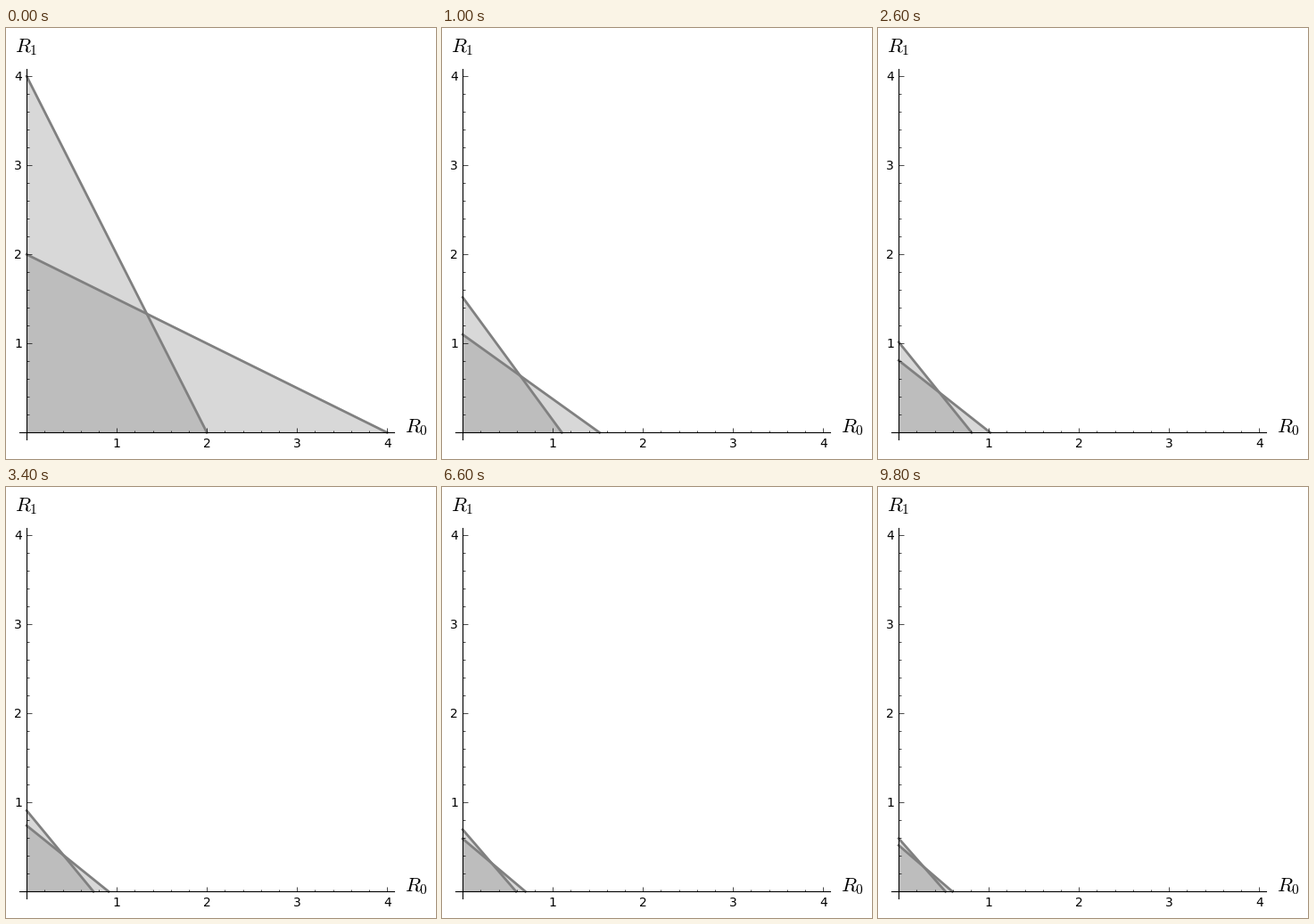
Recreate the animation shown at these times as a matplotlib script. Size 482 px wide and 484 px high, loop 10 s.

```python
import numpy as np
import matplotlib.pyplot as plt
from matplotlib.animation import FuncAnimation

W, H, DPI = 482, 484, 100
FRAMES, INTERVAL = 50, 200
X0, Y0 = 23.2, 454.3          # pixel position of the plot's zero point
UX, UY = 101.0, 100.0         # pixels per unit
MARGIN = 0.08                 # axes reach this far past 0 and 4
MAJOR, MINOR = 5.6, 2.8       # tick lengths

plt.rcParams["font.family"] = "DejaVu Sans"
plt.rcParams["mathtext.fontset"] = "cm"


def px(x):
    return X0 + UX * x


def py(y):
    return Y0 - UY * y


def uptake_path(count, rate=0.05, capacity=2.0, substeps=200):
    """Mean uptake of two consumers adapting to two logistic resources."""
    h, path = 0.375, []
    dt = 1 / substeps
    for _ in range(count):
        path.append(h)
        for _ in range(substeps):
            resource = 1 / (2 * h)
            h += dt * rate * (1 - resource / capacity) / h**2
    return path


uptake = uptake_path(FRAMES)

fig = plt.figure(figsize=(W / DPI, H / DPI), dpi=DPI, facecolor="white")
ax = fig.add_axes([0, 0, 1, 1])
ax.set_xlim(0, W)
ax.set_ylim(H, 0)
ax.axis("off")


def stroke(xs, ys, width, cap="butt"):
    ax.plot(xs, ys, color="black", lw=width, solid_capstyle=cap,
            snap=True, zorder=3)


def draw_axes():
    ends = np.array([-MARGIN, 4 + MARGIN])
    stroke(px(ends), [Y0, Y0], 0.8, "projecting")
    stroke([X0, X0], py(ends), 0.8, "projecting")
    for i in range(1, 21):
        v = i / 5
        size = MINOR if i % 5 else MAJOR
        stroke([px(v)] * 2, [Y0, Y0 - size], 0.5)
        stroke([X0, X0 + size], [py(v)] * 2, 0.5)
    for n in range(1, 5):
        ax.text(px(n), 471, str(n), size=10, ha="center", va="baseline")
        ax.text(18, py(n) + 4.7, str(n), size=10, ha="right", va="baseline")
    ax.text(447, 454, "$R_0$", size=16, ha="left", va="baseline")
    ax.text(22.5, 27, "$R_1$", size=16, ha="center", va="baseline")


draw_axes()
fills = [ax.fill([X0] * 3, [Y0] * 3, color="gray", alpha=0.3, lw=0, zorder=1)[0]
         for _ in range(2)]
lines = [ax.plot([], [], color="gray", lw=2, solid_capstyle="projecting",
                 zorder=2)[0] for _ in range(2)]


def update(i):
    low, high = 1 / (uptake[i] + 0.125), 1 / (uptake[i] - 0.125)
    for fill, line, a, b in zip(fills, lines, (low, high), (high, low)):
        fill.set_xy(np.array([[X0, Y0], [px(a), Y0], [X0, py(b)]]))
        line.set_data([X0, px(a)], [py(b), Y0])
    return fills + lines


anim = FuncAnimation(fig, update, frames=FRAMES, interval=INTERVAL,
                     init_func=lambda: update(0), repeat=True,
                     repeat_delay=0, blit=False)
plt.show()
```
